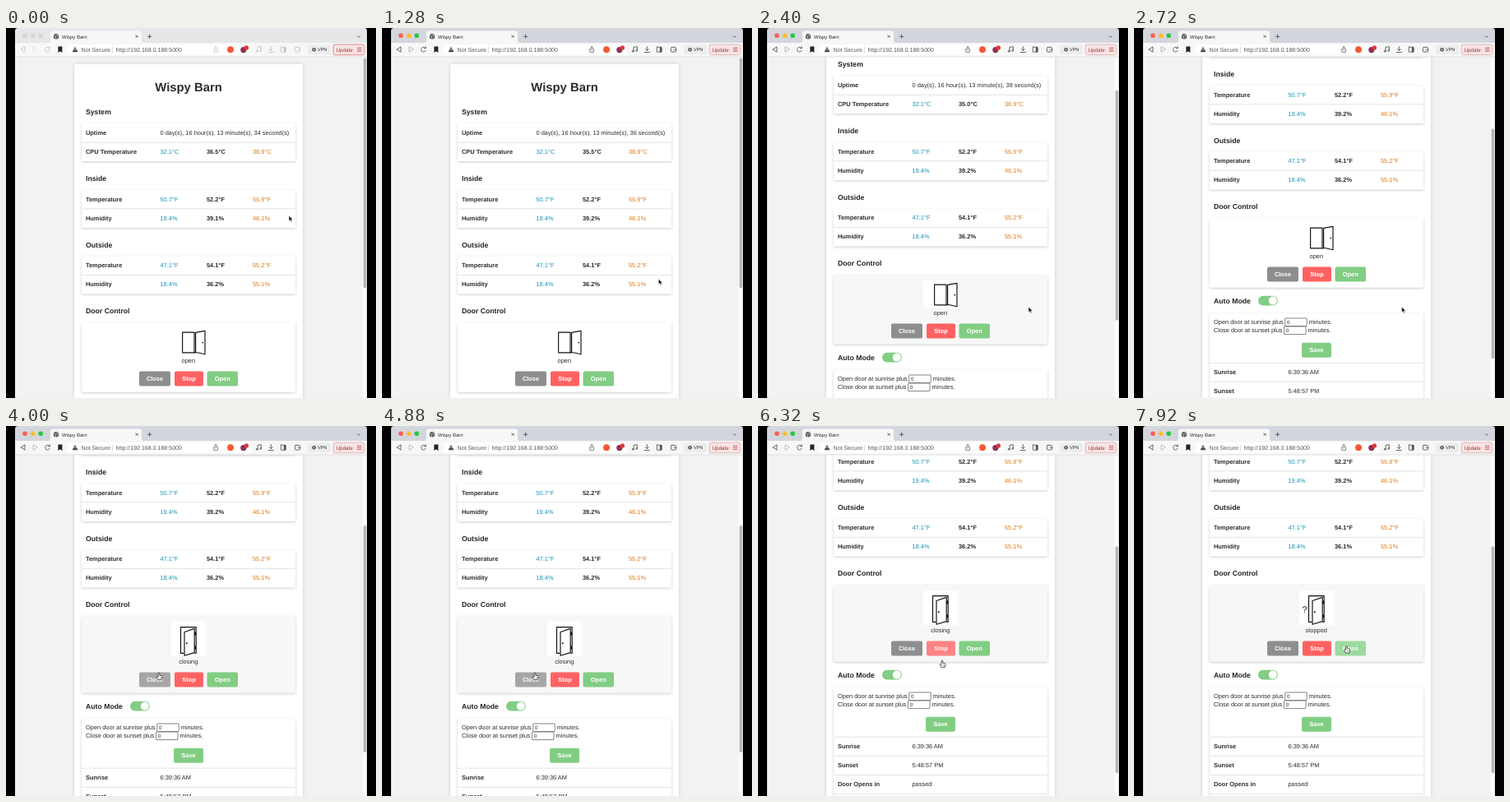
An HTML page for the animation above (8000 ms loop, 450 px wide and 450 px high).

```html
<!DOCTYPE html>
<html lang="en">
<head>
<meta charset="utf-8">
<title>Wispy Barn</title>
<style>
html, body { margin: 0; width: 100%; height: 100%; overflow: hidden; background: #000; }
svg { display: block; width: 450px; height: 450px; }
text { font: 7.42px "Liberation Sans", Arial, sans-serif; fill: #2c2c2c; white-space: pre; text-rendering: geometricPrecision; }
.b { font-weight: 700; }
.h1 { font-size: 14.83px; font-weight: 700; }
.h3 { font-size: 8.68px; font-weight: 700; fill: #222; }
.mid { text-anchor: middle; }
.low { fill: #1c92b4; }
.high { fill: #dd7a17; }
.btn { fill: #fff; font-weight: 700; text-anchor: middle; }
.ui { font-size: 7.05px; fill: #555; }
.card { fill: #fff; filter: drop-shadow(0 0 2px rgba(0,0,0,.14)); }
.box { fill: #fff; filter: drop-shadow(0 1px 1.5px rgba(0,0,0,.2)); }
.rule { stroke: #ddd; stroke-width: .8; }
.line { fill: none; stroke: #111; stroke-width: 1.15; stroke-linejoin: round; }
.icon { fill: none; stroke: var(--ink); stroke-width: .9; stroke-linecap: round; stroke-linejoin: round; }
</style>
</head>
<body>
<svg id="stage" viewBox="0 0 450 450"></svg>
<script>
const LOOP = 8000, STEP = 80, TOP = 35, VIEW = 415;

// [time, value...] tables; tracks are interpolated, states are held
const scrollTrack = [[1840, 0], [1920, 6], [2400, 58], [2720, 127], [5040, 127], [5680, 165]];
const cursorTrack = [
  [160, 344, 228], [1760, 333, 338], [1920, 333, 338], [2400, 329, 339], [2720, 325.5, 339],
  [3360, 186, 300], [5040, 186, 300], [5840, 222, 270], [6240, 222, 272],
  [6320, 224, 285], [6560, 225, 287], [7040, 225, 287], [7200, 252, 270],
  [7520, 252, 270], [7920, 258.5, 267.5]
];
const seconds = [[0, 34], [400, 35], [1040, 36], [1680, 37], [2320, 38]];
const cpuTemp = [[0, '36.5'], [1040, '35.5'], [2320, '35.0']];
const humidIn = [[0, '39.1'], [1040, '39.2']];
const humidOut = [[0, '36.2'], [6880, '36.1']];
const doorState = [[0, 'open'], [4000, 'closing'], [6880, 'stopped']];
const FOCUS_AT = 400;

const BUTTON_Y = 417.6;
const buttons = [
  { id: 'Close', x: 162, w: 38, fill: '#8e8e8e', hover: '#a6a6a6' },
  { id: 'Stop', x: 205, w: 35, fill: '#ff6262', hover: '#ff8383' },
  { id: 'Open', x: 244.5, w: 37.5, fill: '#82cd84', hover: '#9dd99f' }
];

function track(keys, t) {
  const i = keys.findIndex(k => k[0] > t);
  if (i === 0) return keys[0].slice(1);
  if (i < 0) return keys[keys.length - 1].slice(1);
  const a = keys[i - 1], b = keys[i], p = (t - a[0]) / (b[0] - a[0]);
  return a.slice(1).map((v, n) => v + (b[n + 1] - v) * p);
}
const held = (keys, t) => keys.filter(k => k[0] <= t).pop()[1];

// markup helpers; y of text is the centre of its capitals
const text = (x, y, s, cls = '', id = '') =>
  `<text x="${x}" y="${y + 2.4}" class="${cls}" id="${id}">${s}</text>`;
const rect = (x, y, w, h, attrs = '') =>
  `<rect x="${x}" y="${y}" width="${w}" height="${h}" ${attrs}/>`;
const dot = (x, y, r, attrs = '') => `<circle cx="${x}" cy="${y}" r="${r}" ${attrs}/>`;
const path = (d, attrs = 'class="icon"') => `<path d="${d}" ${attrs}/>`;
const box = (y, h, id = '') => rect(92, y, 260, h, `rx="1.5" class="box" id="${id}"`);
const rule = y => path(`M92 ${y}H352`, 'class="rule"');
const heading = (y, s) => text(97, y + .8, s, 'h3');
const button = (x, y, w, s, fill, id = '') =>
  rect(x, y, w, 18, `rx="2" fill="${fill}" id="${id}"`) + text(x + w / 2, y + 9.2, s, 'btn');

function readings(y, label, unit, low, mid, high, id = '') {
  return text(97, y, label, 'b') + text(187.5, y, low + unit, 'low') +
    text(244, y, mid + unit, 'b', id) + text(300, y, high + unit, 'high');
}

function pair(y, label, value) {
  return text(97, y, label, 'b') + text(187.5, y, value);
}

function minutesLine(y, label, x) {
  return text(97, y, label) +
    rect(x, y - 5, 26.5, 9.6, 'fill="#fff" stroke="#666" stroke-width=".8" rx=".6"') +
    `<text x="${x + 2.3}" y="${y + 2.3}" style="font-size:6.2px">0</text>` +
    text(x + 29, y, 'minutes.');
}

const openDoor = path('M214.6 370.1H229V394.8H214.6ZM230.6 370.4L242 368.4V396.8L230.6 394.2Z', 'class="line"') +
  path('M229 394.8H231', 'class="line"') + dot(239.3, 382.6, .9, 'fill="#111"');

const ajarDoor = path('M216.5 403.3H212.5V371.6H231.2V403.3H229.5', 'class="line"') +
  path('M217 377.5L229.2 373.4V402.6L217 406.2Z', 'class="line" style="fill:#fff"') +
  dot(219.8, 391.3, 1, 'fill="#111"') +
  rect(229, 377.5, 2, 4, 'fill="#111"') + rect(229, 394.5, 2, 4, 'fill="#111"') +
  `<text id="query" x="204.6" y="392" style="font-size:11px;fill:#222">?</text>`;

const page =
  rect(83, 44, 278, 640, 'rx="2" class="card"') +
  `<text x="222" y="77.2" class="h1 mid">Wispy Barn</text>` +
  heading(102, 'System') + box(116, 46) + rule(139.3) +
  text(97, 128, 'Uptime', 'b') + text(187.5, 128, '', '', 'uptime') +
  readings(150.6, 'CPU Temperature', '°C', '32.1', '36.5', '38.9', 'cpu') +
  heading(183, 'Inside') + box(197, 46) + rule(219.8) +
  readings(208.4, 'Temperature', '°F', '50.7', '52.2', '55.9') +
  readings(231.2, 'Humidity', '%', '19.4', '39.1', '46.1', 'humidIn') +
  heading(263.6, 'Outside') + box(277.5, 46) + rule(300.4) +
  readings(289, 'Temperature', '°F', '47.1', '54.1', '55.2') +
  readings(312, 'Humidity', '%', '18.4', '36.2', '55.1', 'humidOut') +
  heading(344.2, 'Door Control') + box(358.2, 84.5, 'doorBox') +
  rect(201, 365.1, 42, 33, 'fill="#fff" id="photo"') +
  `<g id="openDoor">${openDoor}</g><g id="ajarDoor">${ajarDoor}</g>` +
  `<g id="below">` +
    text(221.8, 404.4, '', 'mid', 'state') +
    buttons.map(b => button(b.x, BUTTON_Y, b.w, b.id, b.fill, b.id)).join('') +
    heading(459.2, 'Auto Mode') +
    rect(151, 452.8, 23.8, 11.6, 'rx="5.8" fill="#82cd84"') + dot(168.8, 458.6, 5, 'fill="#fff"') +
    box(473.5, 153.5) +
    minutesLine(485, 'Open door at sunrise plus', 183.7) +
    minutesLine(495, 'Close door at sunset plus', 182.5) +
    button(204, 509.8, 36, 'Save', '#82cd84') +
    [534.2, 557.3, 580.4, 603.5].map(rule).join('') +
    pair(546, 'Sunrise', '6:39:36 AM') +
    pair(569, 'Sunset', '5:48:57 PM') +
    pair(592, 'Door Opens in', 'passed') +
  `</g>`;

const chrome =
  path('M11 35V3.5Q11 0 14.5 0H435.5Q439 0 439 3.5V35Z', 'id="strip"') +
  rect(11, 18, 428, 17, 'fill="#f7f7f8"') +
  path('M52 18Q54 18 54 15V6Q54 3.5 57 3.5H162Q165 3.5 165 6V15Q165 18 167 18Z', 'fill="#f7f7f8"') +
  path('M11 35H439', 'stroke="#d8d8d8" stroke-width=".8"') +
  ['#ff5f57', '#febc2e', '#28c840'].map((c, i) => dot(23 + i * 9.6, 9.3, 2.8, `class="light" data-on="${c}"`)).join('') +
  dot(61, 10.3, 3.2, 'fill="#555"') +
  path('M58.4 9.2Q60 9 60.6 10.8T60 13M62 7.6Q61.4 9.4 63.6 10.2', 'fill="none" stroke="#eee" stroke-width=".8"') +
  `<text x="68" y="12.6" style="font-size:6px">Wispy Barn</text>` +
  path('M157.6 8.8l3 3m0 -3l-3 3M172 10.3h5.4M174.7 7.6v5.4M427 9.4l1.9 1.9l1.9 -1.9', 'fill="none" stroke="#444" stroke-width=".8"') +
  rect(75, 20, 223, 12.6, 'rx="2" fill="#fff"') +
  path('M23 23.2V29.2L18.2 26.2Z') + path('M33 23.2V29.2L37.8 26.2Z', 'class="icon" opacity=".4"') +
  path('M52.6 24.2A2.9 2.9 0 1 0 53.2 27.2M53.3 22.8V24.7H51.3') +
  path('M63.4 22.4H68.4V30L65.9 28.2L63.4 30Z', 'fill="#222"') +
  path('M84 22.8L87.4 29.2H80.6Z', 'fill="#444"') + rect(83.6, 25, .8, 2.2, 'fill="#fff"') +
  text(91.6, 26.1, 'Not Secure', 'ui') + path('M129.5 22.5V30', 'stroke="#ccc" stroke-width=".7"') +
  text(133.6, 26.1, 'http://192.168.0.188:5000', 'ui') +
  path('M253.8 25.2H252.8V29.4H257.4V25.2H256.4M255.1 27V22.4M253.8 23.6L255.1 22.3L256.4 23.6', 'class="icon" style="stroke-width:.7"') +
  dot(273, 26.2, 3.9, 'fill="#f4572e"') +
  dot(288.8, 26.6, 3.6, 'fill="#8d3450"') + dot(292.4, 24, 2.7, 'fill="#e5383b"') +
  path('M306 28.2V23.4L310.4 22.6V27.4') + dot(305.2, 28.3, .9, 'class="icon"') + dot(309.6, 27.5, .9, 'class="icon"') +
  path('M322.3 22.6V27.4M320.3 25.6L322.3 27.6L324.3 25.6M319.2 29.6H325.4') +
  rect(334.2, 23.2, 6, 6, 'class="icon" rx=".6"') + rect(337.8, 23.2, 2.4, 6, 'style="fill:var(--ink)"') +
  rect(351.4, 23.4, 6.2, 5.6, 'class="icon" rx="1"') + path('M355.2 26.2H357.6') +
  rect(367, 20.4, 28, 11.8, 'rx="3" fill="#ececee"') + dot(374.6, 26.2, 2.3, 'fill="#555"') +
  dot(374.6, 26.2, .8, 'fill="#eee"') +
  `<text x="379" y="28.2" style="font-size:5.5px">VPN</text>` +
  rect(398, 20, 38, 12.8, 'rx="2.2" fill="#f8e3e3" stroke-width=".9" id="update"') +
  `<text x="401.4" y="28.5" style="font-size:6.3px;fill:#9c3a3a">Update</text>` +
  path('M427 24.2h5.6M427 26.3h5.6M427 28.4h5.6', 'stroke="#c04848" stroke-width=".8"');

const stage = document.getElementById('stage');
stage.innerHTML =
  `<clipPath id="view">${rect(11, TOP, 428, VIEW)}</clipPath>` +
  rect(0, 0, 450, 450) + rect(11, TOP, 428, VIEW, 'fill="#f2f2f2"') +
  `<g clip-path="url(#view)"><g id="page">${page}</g></g>` +
  rect(433.5, TOP, 5.5, VIEW, 'fill="#fafafa"') +
  rect(434.7, 36.5, 3.6, 280, 'rx="1.8" fill="#b4b4b4" id="thumb"') + chrome +
  `<g id="arrow">${path('M0 0V7L1.6 5.6L2.7 8.1L3.9 7.6L2.8 5.2H5Z', 'fill="#111" stroke="#fff" stroke-width=".6"')}</g>` +
  `<g id="hand">${path('M-.9 .5Q0 -.5 .8 .5V3.2L3.2 3.6Q4.3 4 4 5.4L3.3 8.6H-1.1L-3 5.5Q-2.6 4.3 -.9 5.3Z',
    'fill="#fff" stroke="#333" stroke-width=".8" stroke-linejoin="round"')}${path('M1.1 5.2V7M2.4 5.2V7', 'stroke="#555" stroke-width=".5"')}</g>`;

const $ = id => document.getElementById(id);
const set = (id, attrs) => { for (const k in attrs) $(id).setAttribute(k, attrs[k]); };
const show = (id, on) => { $(id).style.display = on ? '' : 'none'; };
const put = (id, s) => { $(id).textContent = s; };
const inside = (v, a, size) => v >= a && v <= a + size;

function render(t) {
  const [scroll] = track(scrollTrack, t);
  const [x, y] = track(cursorTrack, t);
  const state = held(doorState, t), ajar = state !== 'open', grow = ajar ? 9 : 0;
  const active = t >= FOCUS_AT;

  put('uptime', `0 day(s), 16 hour(s), 13 minute(s), ${held(seconds, t)} second(s)`);
  put('cpu', held(cpuTemp, t) + '°C');
  put('humidIn', held(humidIn, t) + '%');
  put('humidOut', held(humidOut, t) + '%');
  put('state', state);
  show('openDoor', !ajar);
  show('ajarDoor', ajar);
  show('query', state === 'stopped');

  set('page', { transform: `translate(0 ${-scroll})` });
  set('below', { transform: `translate(0 ${grow})` });
  set('photo', { height: 33 + grow });
  const ratio = VIEW / (615 + grow);
  set('thumb', { y: 36.5 + scroll * ratio, height: VIEW * ratio });

  // hover follows the pointer one step late
  const [hx, hy] = track(cursorTrack, t - STEP);
  const py = hy + scroll;
  const over = inside(hx, 92, 260) && inside(py, 358.2, 84.5 + grow);
  set('doorBox', { height: 84.5 + grow, style: `fill:${over ? '#f7f7f7' : '#fff'}` });
  let onButton = false;
  for (const b of buttons) {
    const hit = inside(hx, b.x, b.w) && inside(py, BUTTON_Y + grow, 18);
    set(b.id, { fill: hit ? b.hover : b.fill });
    onButton = onButton || hit;
  }
  show('hand', onButton);
  show('arrow', !onButton);
  set(onButton ? 'hand' : 'arrow', { transform: `translate(${x} ${y})` });

  stage.style.setProperty('--ink', active ? '#555' : '#c4c4c4');
  set('strip', { fill: active ? '#d3d6dc' : '#e6e7e9' });
  set('update', { stroke: active ? '#dcb4b4' : '#d98080' });
  for (const l of document.querySelectorAll('.light')) l.setAttribute('fill', active ? l.dataset.on : '#d6d6d6');
}

const start = performance.now();
function tick() {
  const t = (performance.now() - start) % LOOP;
  render(Math.floor(t / STEP) * STEP);
  requestAnimationFrame(tick);
}
tick();
</script>
</body>
</html>
```
